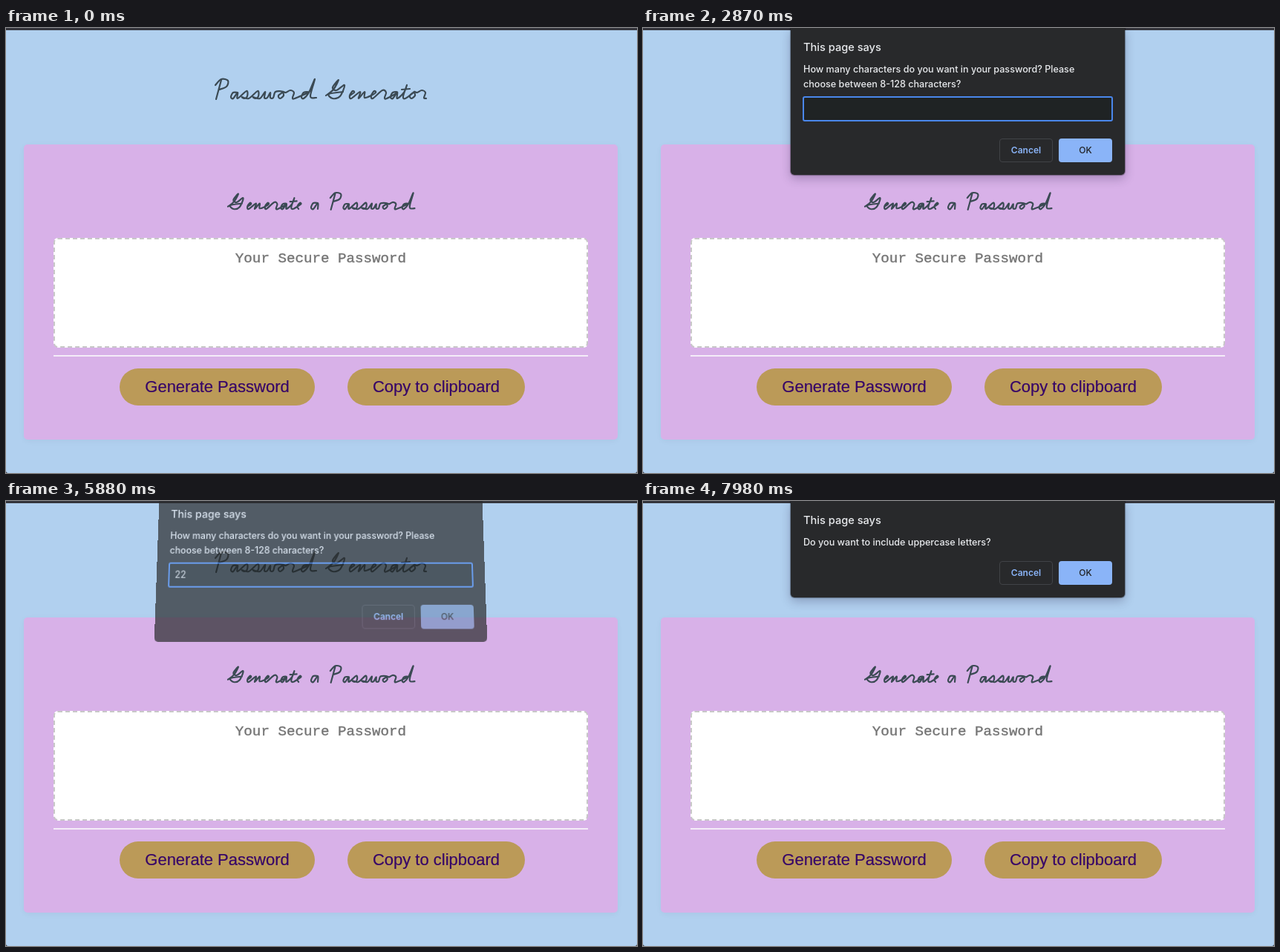
An HTML page that plays this animation: 850 px wide and 600 px high, repeating every 8000 ms.

```html
<!DOCTYPE html>
<html lang="en">
<head>
<meta charset="utf-8">
<title>Password Generator</title>
<style>
  html, body { margin: 0; width: 100%; height: 100%; overflow: hidden; background: #34353c; }
  * { box-sizing: border-box; }
  #stage { position: relative; width: 850px; height: 600px; overflow: hidden;
    background: #b1d0ef; border-radius: 0 0 3px 3px; }
  #stage * { position: absolute; white-space: pre; }
  .bar { left: 0; top: 0; width: 850px; height: 2.5px; background: #34353c; }
  .card { left: 24px; top: 157px; width: 800px; height: 398px; border-radius: 5px;
    background: #d8b1e8; box-shadow: 0 2px 8px rgba(0, 0, 0, .04); }
  .output { left: 64px; top: 283px; width: 720px; height: 148px; border: 2px dashed #c8c8c8;
    border-radius: 6px; background: #fff; color: #757575; text-align: center;
    font: 19.2px/52px "Liberation Mono", monospace; -webkit-text-stroke: .4px; }
  .rule { left: 64px; top: 441px; width: 720px; height: 2px; background: #f4ecf8; }
  .pill { top: 459px; height: 50px; border-radius: 25px; background: #bb9a58; color: #360568;
    text-align: center; font: 22px/49px "Liberation Sans", Arial, sans-serif;
    -webkit-text-stroke: .2px; }
  #script { left: 0; top: 0; fill: none; stroke: #3b4a54; stroke-width: 2.2;
    stroke-linecap: round; stroke-linejoin: round; }
  #script path { vector-effect: non-scaling-stroke; }
  #dialog { left: 199px; top: 0; width: 450px; border-radius: 0 0 5px 5px; background: #28292b;
    color: #e8eaed; box-shadow: 0 0 1px 1px rgba(0, 0, 0, .35), 0 5px 14px rgba(30, 20, 60, .28);
    transform-origin: 50% 100%; font: 500 12.6px/20px Inter, sans-serif; }
  .says { left: 17px; top: 16px; font-size: 14.6px; }
  #message { left: 17px; top: 46px; }
  #field { left: 16px; top: 92px; width: 418px; height: 34px; border: 2px solid #4a87ec;
    border-radius: 3px; background: #1f2324; }
  #typed { left: 7px; top: 5px; font-weight: 400; }
  #caret { top: 7px; width: 1px; height: 16px; background: #fff; }
  .button { bottom: 17px; width: 72px; height: 32px; border-radius: 4px; text-align: center;
    font-size: 12px; line-height: 31px; }
  .cancel { left: 281px; border: 1px solid #414347; color: #8ab4f8; line-height: 29px; font-weight: 600; }
  #ok { left: 361px; color: #202124; }
</style>
</head>
<body>
<div id="stage">
  <div class="bar"></div>
  <div class="card"></div>
  <svg id="script" width="850" height="600" role="img" aria-label="Password Generator. Generate a Password"></svg>
  <div class="output">Your Secure Password</div>
  <div class="rule"></div>
  <div class="pill" style="left:153px;width:263px">Generate Password</div>
  <div class="pill" style="left:460px;width:239px">Copy to clipboard</div>
  <div id="dialog">
    <div class="says">This page says</div>
    <div id="message"></div>
    <div id="field"><span id="typed"></span><i id="caret"></i></div>
    <div class="button cancel">Cancel</div>
    <div class="button" id="ok">OK</div>
  </div>
</div>
<script>
const el = id => document.getElementById(id);
const clamp = v => Math.max(0, Math.min(1, v));

// Handwriting: advance width, then points of the pen; "|" lifts the pen.
const glyphs = {
  P: [20, '9,-25 2,1|1,-18 9,-26 18,-24 16,-16 6,-12'],
  G: [28, '0,-4 10,-12 17,-25 9,-15 14,-11 25,-18 19,-3 9,0 4,-6 23,-9'],
  a: [14, '11,-8 5,-8 2,-2 5,0 11,-8 11,0'],
  s: [15, '9,-10 10,-3 6,0 3,-2 12,0'],
  w: [19, '4,-9 3,-1 7,-1 11,-8 11,-1 15,-1 18,-9'],
  o: [14, '9,-9 3,-4 5,0 10,-4 9,-9 13,-8'],
  r: [14, '5,-11 10,-8 8,-1 11,0'],
  d: [24, '15,-8 9,-8 6,-2 9,0 16,-8 24,-26 18,-3 26,-1'],
  e: [14, '4,-4 10,-8 8,-10 4,-4 6,0'],
  n: [15, '4,-9 2,0 10,-9 10,-1'],
  t: [11, '6,-8 10,-18 5,-3 8,0|3,-12 14,-13']
};

function smooth(points) {
  let path = 'M' + points[0];
  for (let i = 0; i < points.length - 1; i++) {
    const a = points[i], b = points[i + 1];
    const before = points[i - 1] || a, after = points[i + 2] || b;
    const c1 = a.map((v, k) => v + (b[k] - before[k]) / 6);
    const c2 = b.map((v, k) => v - (after[k] - a[k]) / 6);
    path += `C${c1} ${c2} ${b}`;
  }
  return path;
}

function write(word, x, y, scale) {
  const joined = [], strokes = [joined];
  let pen = 0;
  for (const letter of word) {
    const [advance, shape] = glyphs[letter];
    const parts = shape.split('|').map(part => part.split(' ').map(pair => {
      const [px, py] = pair.split(',').map(Number);
      return [px + pen, py];
    }));
    if (letter > 'Z') joined.push(...parts.shift());
    strokes.push(...parts);
    pen += advance;
  }
  const d = strokes.filter(s => s.length).map(smooth).join('');
  el('script').innerHTML += `<path d="${d}" transform="translate(${x} ${y}) scale(${scale})"/>`;
}
write('Password', 281, 95, 1);
write('Generator', 431, 95, 1);
write('Generate', 299, 244, .82);
write('a', 409, 244, 1);
write('Password', 436, 244, .835);

const dialogs = [
  { open: 2197, press: 5530, hide: 5850, prompt: true,
    text: 'How many characters do you want in your password? Please\nchoose between 8-128 characters?' },
  { open: 5890, press: 7280, hide: 7740, text: 'Do you want to include lowercase letters?' },
  { open: 7850, press: 9e3, hide: 9e3, text: 'Do you want to include uppercase letters?' }
];
const STEP = 70, BLINK = 560;

function render(t) {
  const current = dialogs.filter(d => t >= d.open).pop();
  el('dialog').style.display = current ? 'block' : 'none';
  if (!current) return;

  const shown = t < current.hide
    ? 1 - (1 - clamp((t - current.open) / 130)) ** 2
    : 1 - clamp((t - current.hide) / 100);
  const away = 1 - shown;
  Object.assign(el('dialog').style, {
    height: current.prompt ? '198px' : '130px',
    opacity: shown,
    boxShadow: away ? 'none' : '',
    transform: away
      ? `translateY(${-27 * away}px) perspective(900px) rotateX(${27 * away}deg)
         scale(${1 - .01 * away}, ${1 + .13 * away})`
      : 'none'
  });
  el('message').textContent = current.text;
  el('field').style.display = current.prompt ? 'block' : 'none';

  const typed = t < 3920 ? '' : t < 4130 ? '2' : '22';
  const blinkStart = t < 3920 ? 2310 : t < 4130 ? 3920 : 4130;
  el('typed').textContent = typed;
  el('caret').style.left = 7 + typed.length * 7.6 + 'px';
  el('caret').style.opacity = Math.floor(Math.max(0, t - blinkStart) / BLINK) % 2 ? 0 : 1;

  const pressed = clamp((t - current.press) / 210);
  el('ok').style.background = `color-mix(in srgb, #7794c1 ${pressed * 100}%, #8ab4f8)`;
}

function tick() {
  render(Math.floor(performance.now() % 8000 / STEP) * STEP);
  requestAnimationFrame(tick);
}
tick();
</script>
</body>
</html>
```
